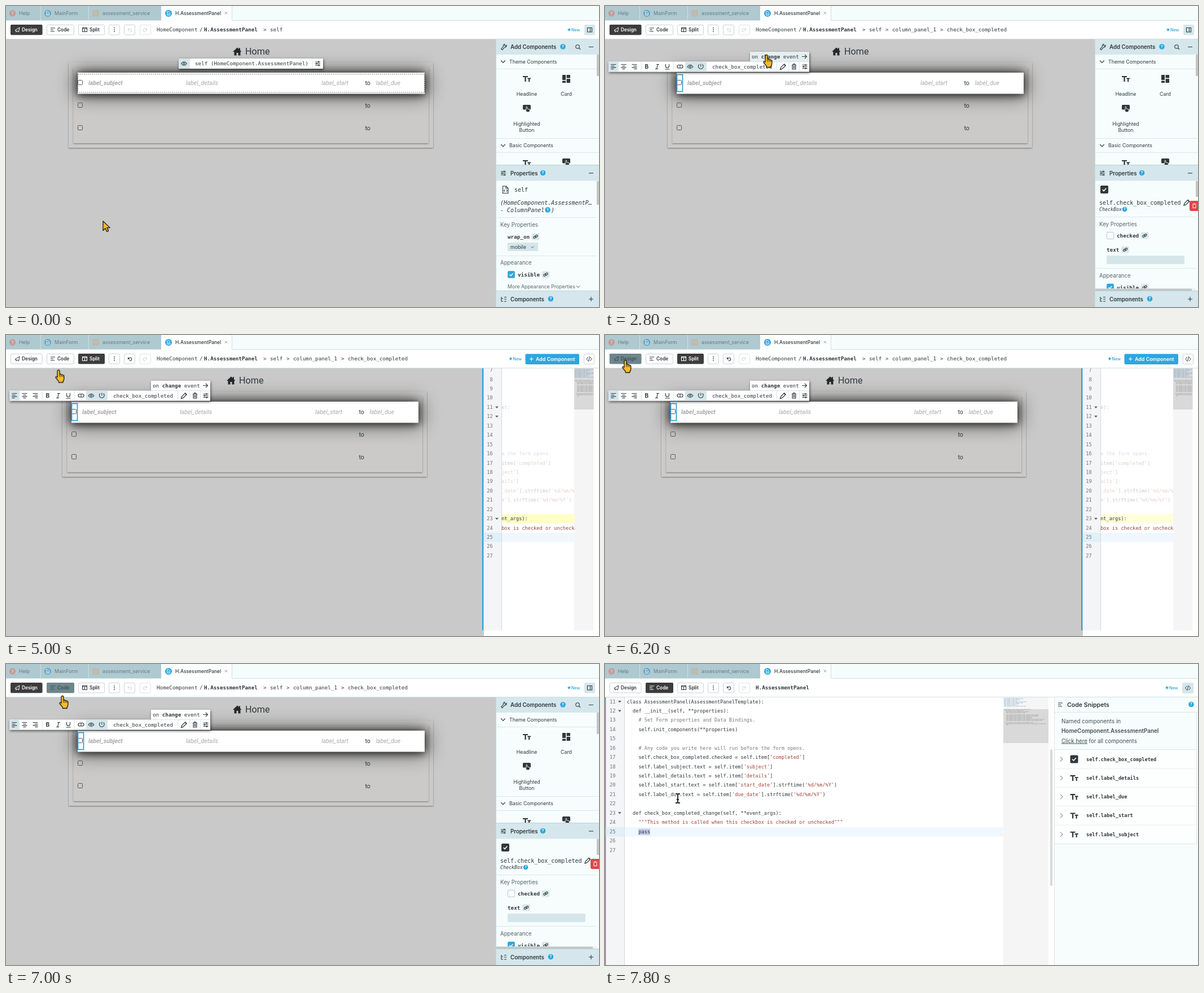
These frames come from a looping animation (1051 by 533 pixels, 8 s). An HTML page:

```html
<!DOCTYPE html>
<html lang="en">
<head>
<meta charset="utf-8">
<title>Form editor</title>
<style>
html, body { margin: 0; width: 100%; height: 100%; overflow: hidden; background: #fff; }
svg { display: block; }
text { font-family: Inter, sans-serif; font-size: 8.8px; fill: currentColor; white-space: pre; }
.ink { color: #2f383c; }
.mono { font-family: "DejaVu Sans Mono", monospace; font-size: 9.27px; }
.m10 { font-size: 10px; }
.m8 { font-size: 8.6px; }
.b { font-weight: 700; }
.sb { font-weight: 600; }
.i { font-style: italic; }
.mid { text-anchor: middle; }
.end { text-anchor: end; }
.head { font-size: 9.7px; font-weight: 600; }
.sub { font-size: 9.7px; color: #59666b; }
.btn { font-size: 8.3px; font-weight: 600; }
.form { font-family: Roboto, sans-serif; font-size: 10.6px; }
.ghost { color: #a9a9a9; font-style: italic; }
.line { fill: none; stroke: currentColor; stroke-width: 1.1; }
.str { fill: #a0443a; }
.com { fill: #7b7b7b; }
.num { fill: #6c7478; }
.dim { opacity: .25; }

.root, .pick, .probe, .design, .split, .code, .onEvent, .onDesign, .onCode,
.arrow, .hand, .beam { animation: 8s step-end infinite; }
.root { animation-name: root; }
.pick { animation-name: pick; }
.probe { animation-name: probe; }
.design { animation-name: design; }
.split { animation-name: split; }
.code { animation-name: code; }
.onEvent { animation-name: onEvent; }
.onDesign { animation-name: onDesign; }
.onCode { animation-name: onCode; }
.arrow { animation-name: arrow; }
.hand { animation-name: hand; }
.beam { animation-name: code; }
.page { animation: page 8s step-end infinite; }
.flash { animation: flash 8s infinite; }
.cursor { animation: cursor 8s infinite; }

@keyframes root { 0% { opacity: 1 } 20%, 100% { opacity: 0 } }
@keyframes pick { 0% { opacity: 0 } 20%, 100% { opacity: 1 } }
@keyframes probe { 0% { opacity: 0 } 15% { opacity: 1 } 20%, 100% { opacity: 0 } }
@keyframes design { 0% { opacity: 1 } 42.5% { opacity: 0 } 80% { opacity: 1 } 90%, 100% { opacity: 0 } }
@keyframes split { 0% { opacity: 0 } 42.5% { opacity: 1 } 80%, 100% { opacity: 0 } }
@keyframes code { 0% { opacity: 0 } 90%, 100% { opacity: 1 } }
@keyframes onEvent { 0% { opacity: 0 } 27.5% { opacity: 1 } 55%, 100% { opacity: 0 } }
@keyframes onDesign { 0% { opacity: 0 } 65% { opacity: 1 } 80%, 100% { opacity: 0 } }
@keyframes onCode { 0% { opacity: 0 } 85% { opacity: 1 } 90%, 100% { opacity: 0 } }
@keyframes arrow { 0% { opacity: 1 } 12.5% { opacity: 0 } 57.5% { opacity: 1 } 62.5%, 100% { opacity: 0 } }
@keyframes hand { 0% { opacity: 0 } 12.5% { opacity: 1 } 57.5% { opacity: 0 } 62.5% { opacity: 1 } 90%, 100% { opacity: 0 } }
@keyframes page { 0% { transform: none } 42.5% { transform: translateX(-11px) } 80%, 100% { transform: none } }
@keyframes flash {
  0%, 42.5% { opacity: .72; animation-timing-function: steps(15) }
  80%, 100% { opacity: .3 }
}
@keyframes cursor {
  0% { transform: translate(172px, 381px); animation-timing-function: steps(2) }
  5% { transform: translate(167px, 345px); animation-timing-function: steps(2) }
  10% { transform: translate(143px, 195px); animation-timing-function: steps(2) }
  15%, 20% { transform: translate(133px, 133px); animation-timing-function: steps(2) }
  25% { transform: translate(205px, 112px); animation-timing-function: steps(2) }
  30% { transform: translate(281px, 89px); animation-timing-function: steps(2) }
  35%, 40% { transform: translate(287px, 87px); animation-timing-function: steps(5) }
  52.5%, 55% { transform: translate(279px, 105px); animation-timing-function: steps(2) }
  60% { transform: translate(150px, 78px); animation-timing-function: steps(2) }
  65% { transform: translate(38px, 47px); animation-timing-function: step-end }
  67.5%, 80% { transform: translate(37px, 45px); animation-timing-function: steps(2) }
  85% { transform: translate(97px, 46px); animation-timing-function: step-end }
  87.5% { transform: translate(101px, 57px); animation-timing-function: steps(4) }
  97.5%, 100% { transform: translate(129px, 238px) }
}
</style>
</head>
<body>
<svg width="1051" height="533" viewBox="0 0 1051 533" class="ink">
<defs>
  <filter id="glow" x="-30%" y="-300%" width="160%" height="700%"><feGaussianBlur stdDeviation="7"/></filter>
  <filter id="halo" x="-30%" y="-300%" width="160%" height="700%"><feGaussianBlur stdDeviation="17"/></filter>
  <filter id="lift" x="-10%" y="-30%" width="120%" height="180%"><feDropShadow dx="1" dy="2" stdDeviation="2" flood-opacity=".6"/></filter>
  <filter id="card" x="-5%" y="-10%" width="110%" height="120%"><feDropShadow dx="0" dy="1" stdDeviation="1.2" flood-opacity=".42"/></filter>
  <clipPath id="splitClip"><path d="M879 59h128v464h-128z"/></clipPath>
  <clipPath id="addClip"><path d="M868 59h183v222h-183z"/></clipPath>
  <clipPath id="propClip"><path d="M868 281h183v224h-183z"/></clipPath>

  <g id="q"><circle r="4.8" fill="#2ba6de"/><text class="mid b" y="2.5" style="font-size:7px;fill:#fff">?</text></g>
  <g id="tt" fill="currentColor"><path d="M-7-5h9v2.1h-3.3v8h-2.3v-8h-3.4zM1.2-1.6h6v1.9h-2v5h-2.1v-5h-1.9z"/></g>
  <g id="press"><rect x="-7" y="-6" width="14" height="8.5" rx="1.5" fill="currentColor"/><path d="M-1-2.5q1.3-1 1.8.5v2.8l4.2 1q1.2 2-.6 5h-4.2l-3-3.5 1.8-.2z" fill="currentColor" stroke="#f6fdfc" stroke-width=".8"/></g>
  <g id="link"><rect x="-6.7" y="-6" width="13.5" height="12" rx="2" fill="#d9e7eb"/><g class="line" transform="rotate(-30)"><rect x="-4" y="-1.6" width="4.6" height="3.2" rx="1.6"/><rect x="-.6" y="-1.6" width="4.6" height="3.2" rx="1.6"/></g></g>
  <g id="sliders" class="line"><path d="M-4.5-3h9M-4.5 0h9M-4.5 3h9"/><path d="M1.5-4.2v2.4M-2-1.2v2.4M2 1.8v2.4" stroke-width="1.9"/></g>
  <g id="eye" class="line"><path d="M-5 0q5-6.500 10 0q-5 6.500-10 0z"/><circle r="1.5"/></g>
  <g id="bars" class="line"><path d="M-4-3h8M-4 0h5M-4 3h7"/></g>
  <g id="down" class="line"><path d="M-3.8-2l3.8 4 3.8-4"/></g>
  <g id="pencil"><path d="M-5 5l1-3.5 6-6.2 2.6 2.6-6.2 6z" fill="none" stroke="currentColor" stroke-width="1.2"/><path d="M1-4l1.5-1 2.5 2.5-1 1.5z" fill="currentColor"/></g>
  <g id="tick"><rect x="-7" y="-7" width="14" height="14" rx="2" fill="currentColor"/><path d="M-3.3 0l2.3 2.5 4.3-4.8" fill="none" stroke="#fff" stroke-width="1.6"/></g>
  <g id="tag"><path d="M-2-4-5 0l3 4M2-4l3 4-3 4M1-5l-2 10" class="line"/></g>
  <g id="doc"><circle r="6" fill="currentColor"/><path d="M-2.3-3.3h3l1.8 1.8v4.8h-4.8z" fill="none" stroke="#fff" stroke-width=".9"/><path d="M-1 0h2M-1 1.6h2" stroke="#fff" stroke-width=".7"/></g>
  <g id="bDesign"><path d="M16 43l8-5-1.5 8-2.8-2-1.7 2.2-.2-2.8z" fill="none" stroke="currentColor"/><text x="28" y="45" class="btn">Design</text></g>
  <g id="bCode"><use href="#bars" x="83" y="42"/><text x="91" y="45" class="btn">Code</text></g>
  <g id="bSplit"><path d="M135.5 38.5h8v7h-8zM139.5 41v4.5M135.5 40h8" class="line"/><text x="148" y="45" class="btn">Split</text></g>
  <g id="undo" class="line"><path d="M216.5 39.5v3h3M216.8 42q2.5-3.5 5.2-1 2 2.8-1 4.5h-2.5"/></g>
  <g id="spark"><path d="M0-3.5l1 2.5 2.5 1-2.5 1-1 2.5-1-2.5-2.5-1 2.5-1z" fill="#2ba0d8"/><text x="4" y="2.6" style="font-size:7.2px;font-weight:500;fill:#2ba0d8">New</text></g>
</defs>

<rect width="1051" height="533" fill="#c9c9ca"/>

<g class="page">
  <path d="M402 81l8-7.5 3 2.8v-2h2v4l2.5 2.7h-2v6.5h-4v-4.5h-3v4.5h-4v-6.5z" fill="#26282a"/>
  <text x="424" y="86" class="form" style="font-size:16.2px">Home</text>
  <g fill="#cbcac9">
    <rect x="111" y="100" width="646" height="151" filter="url(#card)"/><rect x="119.5" y="109" width="629.5" height="134" filter="url(#card)"/>
  </g>
  <rect x="123" y="116" width="623" height="44" opacity=".58" filter="url(#halo)"/>
  <rect x="126" y="118" width="617" height="40" opacity=".75" filter="url(#glow)"/>
  <rect x="127" y="118" width="615" height="37.5" fill="#fff"/>
  <g fill="none" stroke="#55585a">
    <rect x="127.5" y="131.5" width="8" height="8" rx="1"/><rect x="127.5" y="171.5" width="8" height="8" rx="1"/><rect x="127.5" y="211.5" width="8" height="8" rx="1"/>
  </g>
  <g class="ghost">
    <text x="146" y="140" class="form b">label_subject</text><text x="319" y="140" class="form">label_details</text>
    <text x="559" y="140" class="form">label_start</text><text x="655.5" y="140" class="form">label_due</text>
  </g>
  <g style="color:#233845"><text x="636.5" y="140" class="form">to</text><text x="636.5" y="180" class="form">to</text><text x="636.5" y="220" class="form">to</text></g>
  <rect class="root" x="127.5" y="120.5" width="614" height="32.5" fill="none" stroke="#555" stroke-width=".8" stroke-dasharray="2 1.5"/>
  <rect class="probe" x="127" y="121" width="10.500" height="31" fill="none" stroke="#3a9bd0" stroke-dasharray="2 1.5"/>
  <rect class="pick" x="127.5" y="121.5" width="10" height="30" fill="none" stroke="#2f9ad2" stroke-width="1.7"/>
</g>

<g class="root">
  <rect x="306" y="93" width="256" height="18" rx="1" fill="#fdfefe" filter="url(#lift)"/>
  <path d="M306 93h20v18h-20z" fill="#d5e6eb"/>
  <use href="#eye" x="315.5" y="102"/><text x="335" y="105" class="mono">self (HomeComponent.AssessmentPanel)</text><use href="#sliders" x="552.5" y="102"/>
  <path d="M543 93v18" stroke="#dfe5e7"/>
</g>

<g class="pick">
  <g filter="url(#lift)"><path d="M257 81h105v18h-105zM6 98.500h356v18h-356z" fill="#fdfefe"/></g>
  <path class="onEvent" d="M257 81h105v17h-105z" fill="#e4eff1"/>
  <path d="M6 98.500h18v18h-18zM142 98.500h37v18h-37z" fill="#d5e6eb"/>
  <path d="M64.5 99v17M121.5 99v17M179.5 99v17M304.5 99v17M325.5 99v17M344.5 99v17M257 98.5h105" stroke="#dfe5e7" fill="none"/>
  <text x="260" y="93" class="mono">on <tspan class="b">change</tspan> event</text>
  <path class="line" d="M349 89.5h8M354 86l3.5 3.5-3.5 3.5"/>
  <g class="line" transform="translate(0 -.5)">
    <path d="M10.5 104h9M10.5 106.700h6M10.5 109.400h9M10.5 112h5M28.5 104h9M30.5 106.700h5M28.5 109.400h9M30.5 112h5M47.5 104h9M50.5 106.700h6M47.5 109.400h9M51.5 112h5"/>
    <path d="M91 104h5M89 112h5M93.500 104l-2 8M107.5 103.500v3.500q0 3 3 3t3-3v-3.500M106.500 112.500h8"/>
    <rect x="128" y="105" width="10" height="5.500" rx="2.700"/>
    <path d="M133 105v5.500M169.800 103v5M167 104a4.400 4.400 0 1 0 5.600 0M331 105h8M333.500 104.500v-1.500h3v1.500M332 105.500v7h6v-7M334 106.500v4.500M336 106.500v4.500"/>
  </g>
  <text x="70.5" y="111" class="b" style="font-size:10px">B</text>
  <use href="#eye" x="151" y="107.5"/><text x="190" y="110.5" class="mono">check_box_completed</text>
  <use href="#pencil" x="315.5" y="107.5"/><use href="#sliders" x="354" y="107.5"/>
</g>

<g class="design">
  <path d="M868 59h183v474h-183z" fill="#f6fdfc"/>
  <g clip-path="url(#addClip)">
    <path d="M868 111.5h183M868 234.5h183M868 259.5h183" stroke="#dde8ea"/>
    <path d="M868 59h183v27h-183z" fill="#d5e7ec"/>
    <path d="M877.5 76l4-4.5q-1-3.5 2.5-4l-.5 2.5 2 1 1.5-1.5q.5 4-3.5 3.8l-4 4.4z" class="line"/>
    <text x="894" y="76" class="head">Add Components</text><use href="#q" x="987" y="72"/>
    <circle cx="1013" cy="72" r="3.2" class="line"/><path d="M1015.5 74.5l2.5 2.5M1033 72.5h8" class="line" stroke-width="1.5"/>
    <use href="#down" x="881" y="98.5"/><text x="892" y="101.5">Theme Components</text>
    <use href="#tt" x="923" y="129"/><path d="M986 122h6v9h-6zM993.5 122h6.5v5.5h-6.5zM993.5 129h6.5v7h-6.5zM986 132.5h6v3.5h-6z" fill="currentColor"/>
    <text x="923" y="158.5" class="mid">Headline</text><text x="993" y="158.5" class="mid">Card</text>
    <use href="#press" x="923" y="181"/><text x="923" y="212" class="mid">Highlighted</text><text x="923" y="223" class="mid">Button</text>
    <use href="#down" x="881" y="247"/><text x="892" y="250">Basic Components</text>
    <use href="#tt" x="923" y="278"/><use href="#press" x="993" y="276"/>
  </g>
  <g clip-path="url(#propClip)">
    <g class="root">
      <path d="M868 374.5h179M868 442.5h179" stroke="#dde8ea"/>
      <path class="line" d="M880.5 319h6l3.5 3.5v9h-9.5zM886 319v4h4M884 325l-1.5 2 1.5 2M887 325l1.5 2-1.5 2"/>
      <text x="901" y="328.5" class="mono m10">self</text>
      <text x="876" y="352" class="mono m10 i">(HomeComponent.AssessmentP…</text><text x="876" y="364.5" class="mono m10 i">- ColumnPanel</text><text x="966" y="364.5" class="mono m10 i">)</text><use href="#q" x="960" y="361"/>
      <text x="876" y="391" class="sub">Key Properties</text><text x="889" y="412" class="mono b">wrap_on</text><use href="#link" x="938.5" y="408.5"/>
      <rect x="889" y="419" width="54" height="15" rx="1" fill="#d5e6eb"/><text x="894" y="429.5">mobile</text><use href="#down" transform="translate(933 427) scale(.7)"/>
      <text x="876" y="458" class="sub">Appearance</text>
      <use href="#tick" transform="translate(895.5 475.5) scale(.9)" color="#2ba6de"/><text x="907" y="479" class="mono b">visible</text><use href="#link" x="956.5" y="475.5"/>
      <text x="889" y="500" style="color:#59666b">More Appearance Properties</text><use href="#down" transform="translate(1014 497) scale(.8)"/>
      <rect x="1047" y="310" width="4" height="42" fill="#c3c5c5"/>
    </g>
    <g class="pick">
      <path d="M868 373.5h179M868 464.5h179" stroke="#dde8ea"/>
      <use href="#tick" x="885" y="325"/><text x="876" y="351.5" class="mono m10">self.check_box_completed</text><use href="#pencil" x="1031" y="348"/>
      <path d="M1051 345h-12q-3 0-3 3v12q0 3 3 3h12z" fill="#dc484c"/><path d="M1041 351h7M1042 352.5v5h5v-5M1043 350h3" fill="none" stroke="#fff"/>
      <text x="876" y="363" class="mono i" style="font-size:8.3px">CheckBox</text><use href="#q" transform="translate(921 360) scale(.9)"/>
      <text x="876" y="389.5" class="sub">Key Properties</text>
      <rect x="889.5" y="400.5" width="12" height="12" rx="1.5" fill="#fff" stroke="#b8c6ca"/><text x="907" y="410" class="mono b">checked</text><use href="#link" x="956.5" y="406.5"/>
      <text x="889" y="435" class="mono b">text</text><use href="#link" x="922" y="431.5"/>
      <rect x="889" y="442" width="138" height="15" rx="1" fill="#d5e6eb"/>
      <text x="876" y="480.5" class="sub">Appearance</text>
      <use href="#tick" transform="translate(895.5 498) scale(.9)" color="#2ba6de"/><text x="907" y="501.5" class="mono b">visible</text><use href="#link" x="956.5" y="498"/>
      <path d="M869 500h178v5h-178z" fill="#eef3f3"/><rect x="869" y="500.5" width="171" height="4" fill="#c3c5c5"/>
      <rect x="1047" y="310" width="4" height="28" fill="#c3c5c5"/>
    </g>
    <path d="M868 282h183v27.5h-183z" fill="#d5e7ec"/><path d="M868 281.5h183" stroke="#b5d3dc"/>
    <use href="#sliders" x="881.5" y="296"/><text x="894" y="299.5" class="head">Properties</text><use href="#q" x="951.5" y="295.5"/><path d="M1033 296h8" class="line" stroke-width="1.5"/>
  </g>
  <path d="M868 505h183v28h-183z" fill="#d5e7ec"/><path d="M868 504.5h183" stroke="#b5d3dc"/>
  <path class="line" d="M878 515v8h3M878 518h3M883 515.5h4M883 519h4M883 523h4M1033 519h8M1037 515v8"/>
  <text x="894" y="522.5" class="head">Components</text><use href="#q" x="965.5" y="518.5"/>
  <rect x="1047" y="86" width="4" height="38" fill="#c3c5c5"/><path d="M868.5 59v474" stroke="#c5dbe2"/>
</g>

<g class="split">
  <path d="M847 59h204v474h-204z" fill="#fff"/><path d="M847 59h31v464h-31z" fill="#f4f5f6"/>
  <path d="M845 59v464" stroke="#2ba0dc" stroke-width="2"/><path d="M878.5 59v464" stroke="#d5d9da"/>
  <path class="flash" d="M879 317h128v16.5h-128z" fill="#ffff8a"/>
  <path d="M847 350h31v16.5h-31z" fill="#e1eff7"/><path d="M879 350h128v16.5h-128z" fill="#f0f8fe"/>
  <g id="splitNums" transform="translate(844 61.4)"></g>
  <g clip-path="url(#splitClip)"><g id="splitLines" transform="translate(611.8 61.4)"></g></g>
  <path d="M1007 59h34.5v464h-34.5z" fill="#f5f5f5"/><path d="M1007 59h34.5v73h-34.5z" fill="#d9d9d9"/>
  <g id="splitMap" transform="translate(1008 60)"></g>
</g>

<g class="code">
  <path d="M0 59h1051v474h-1051z" fill="#fff"/><path d="M0 59h35v474h-35z" fill="#f4f5f6"/>
  <path d="M.7 59v474" stroke="#2ba6de" stroke-width="1.5"/><path d="M34.5 59v474" stroke="#d5d9da"/>
  <path d="M1.5 289h33v16.5h-33z" fill="#e1eff7"/><path d="M35 289h671v16.5h-671z" fill="#f0f8fe"/><path d="M59 291.5h21v11.5h-21z" fill="#c4cdea"/>
  <g id="codeNums"></g><g id="codeLines"></g>
  <path d="M706 59h80v474h-80z" fill="#f5f5f5"/><path d="M706 80h80v60h-80z" fill="#d9d9d9"/>
  <g id="codeMap" transform="translate(707 60)"></g>
  <rect x="789" y="151" width="4" height="242" rx="2" fill="#d7d9d9"/>
  <path d="M796 59h255v474h-255z" fill="#f6fdfc"/><path d="M797 152h252v166h-252z" fill="#fdfefe"/>
  <path d="M796.5 59v474M797 85.5h254M797 151.5h252M797 318.5h252M1048.5 86v232" stroke="#dae5e7" fill="none"/>
  <use href="#bars" x="807" y="72"/><text x="819" y="75.5" class="sb" style="font-size:10.6px">Code Snippets</text><use href="#q" x="1039" y="71.5"/>
  <g style="color:#444f54">
    <text x="809" y="104.5" style="font-size:9.9px">Named components in</text>
    <text x="809" y="122" class="sb" style="font-size:9.9px">HomeComponent.AssessmentPanel</text>
    <text x="809" y="139.5" style="font-size:9.7px"><tspan text-decoration="underline">Click here</tspan> for all components</text>
  </g>
  <g id="snippets"></g>
</g>

<g>
  <path d="M0 0h1051v26h-1051z" fill="#f4fdfc"/><path d="M0 26h1051v33h-1051z" fill="#fff"/>
  <path d="M0 0h275v26h-275z" fill="#afc9d0"/><path d="M275 0h125v26h-125z" fill="#fdffff"/>
  <path d="M61.5 0v26M146.5 0v26M0 25.5h275M400.5 0v26M400 25.5h651M0 58.5h1051" stroke="#cfdfe3" fill="none"/>
  <circle cx="11.5" cy="13" r="5.7" fill="#c59b98"/><text x="11.5" y="16" class="mid b" style="font-size:8px;fill:#e3d0cf">?</text>
  <use href="#doc" x="74" y="13" color="#63a5c4"/><use href="#doc" x="288" y="13" color="#2ba6de"/>
  <path d="M154.5 8.5h9v9h-9zM156.5 11.5h5M156.5 14.5h5" fill="none" stroke="#d0ab8b" stroke-width="1.5"/>
  <g style="color:#667b83"><text x="23" y="16">Help</text><text x="86" y="16">MainForm</text><text x="171" y="16">assessment_service</text></g>
  <text x="300" y="16" style="font-size:8.5px;font-weight:500">H.AssessmentPanel</text><path d="M388 10.5l4 4M392 10.5l-4 4" stroke="#859196"/>

  <g fill="#fff" stroke="#c9d2d5">
    <rect x="8.5" y="33.5" width="55.5" height="17.5" rx="2"/><rect x="72.5" y="33.5" width="48" height="17.5" rx="2"/><rect x="128.5" y="33.5" width="46" height="17.5" rx="2"/>
    <rect x="182.5" y="33.5" width="19" height="17.5" rx="2"/><rect x="209.5" y="33.5" width="19" height="17.5" rx="2"/><rect x="237.5" y="33.5" width="19" height="17.5" rx="2" opacity=".6"/>
  </g>
  <use href="#bDesign"/><use href="#bCode"/><use href="#bSplit"/>
  <path d="M192 38v1.6M192 41.2v1.6M192 44.4v1.6" stroke="#333" stroke-width="1.6"/>
  <use href="#undo" transform="translate(466 0) scale(-1 1)" opacity=".2"/>
  <g class="design">
    <rect x="8" y="33" width="56.5" height="18.2" rx="2" fill="#3b3c3b"/><use href="#bDesign" color="#fff"/><use href="#undo" opacity=".2"/>
    <use href="#spark" x="998" y="42"/><rect x="1025" y="33" width="19" height="18.5" rx="2" fill="#d5e7ec"/><path class="line" d="M1030.5 38.5h8v7.5h-8zM1035.5 38.5v7.5"/>
  </g>
  <g class="split">
    <rect x="128" y="33" width="47" height="18.2" rx="2" fill="#3b3c3b"/><use href="#bSplit" color="#fff"/><use href="#undo"/>
    <use href="#spark" x="894.5" y="42"/><rect x="920.5" y="33.5" width="95.5" height="18.5" rx="2" fill="#2ba6e2"/>
    <path d="M928 42.5h6.5M931.2 39.2v6.5" stroke="#fff" stroke-width="1.2"/><text x="939" y="45.5" class="sb" style="font-size:8.9px;fill:#fff">Add Component</text>
    <rect x="1024.5" y="33.5" width="18" height="18" rx="2" fill="#fff" stroke="#c9d2d5"/><use href="#tag" transform="translate(1033.5 42.5) scale(.9)"/>
  </g>
  <g class="code">
    <rect x="72" y="33" width="49" height="18.2" rx="2" fill="#3b3c3b"/><use href="#bCode" color="#fff"/><use href="#undo"/>
    <use href="#spark" x="996" y="42"/><rect x="1023" y="33" width="20" height="19" rx="2" fill="#d5e7ec"/><use href="#tag" transform="translate(1033 42.5) scale(.9)"/>
  </g>
  <g class="onDesign"><rect x="8" y="33" width="56.5" height="18.2" rx="2" fill="#6d868c"/><use href="#bDesign" color="#3f5157"/></g>
  <g class="onCode"><rect x="72" y="33" width="49" height="18.2" rx="2" fill="#6d868c"/><use href="#bCode" color="#3f5157"/></g>

  <text x="267" y="45" class="mono">HomeComponent</text><text x="343" y="45" class="mono">/</text><text x="351" y="45" class="mono b">H.AssessmentPanel</text>
  <text x="456" y="45" class="mono">&gt;</text><text x="468" y="45" class="mono">self</text>
  <g class="pick"><text x="497" y="45" class="mono">&gt;</text><text x="509" y="45" class="mono">column_panel_1</text><text x="594" y="45" class="mono">&gt;</text><text x="606" y="45" class="mono">check_box_completed</text></g>
  <g class="code"><path d="M262 32h460v21h-460z" fill="#fff"/><text x="267" y="45" class="mono b">H.AssessmentPanel</text></g>
</g>

<g class="cursor" stroke-linejoin="round">
  <path class="arrow" d="M0 0v16.5l4-3.7 2.6 5.7 3-1.4-2.6-5.5h5.2z" fill="#f7b928" stroke="#1d1a14" stroke-width="1.3"/>
  <g class="hand">
    <g transform="translate(-1 -.5)">
      <path d="M-2 2a2 2 0 0 1 4 0v5.5q2-.8 2.9.8q2-.7 2.9.9q2-.3 2.1 1.7v4q0 3-1.9 5.6v1.5h-7.5v-1.5q-1.5-2.5-5-6.2q-1.1-2 .5-2.6q1-.2 2 1.3z" fill="#f9bb2a" stroke="#1d1a14" stroke-width="1.3"/>
      <path d="M2 8v4M4.9 9v3M7.7 10v2.5" stroke="#1d1a14" fill="none"/>
    </g>
  </g>
  <g class="beam" fill="none">
    <path d="M-4-8h2.5q1.5 0 1.5 1.5v13q0 1.5-1.5 1.5h-2.5M4-8h-2.5q-1.5 0-1.5 1.5v13q0 1.5 1.5 1.5h2.5" stroke="#fff" stroke-width="3.6"/>
    <path d="M-4-8h2.5q1.5 0 1.5 1.5v13q0 1.5-1.5 1.5h-2.5M4-8h-2.5q-1.5 0-1.5 1.5v13q0 1.5 1.5 1.5h2.5M-2 2h4" stroke="#25211f" stroke-width="1.9"/>
  </g>
</g>
</svg>
<script>
const lines = `class AssessmentPanel(AssessmentPanelTemplate):
  def __init__(self, **properties):
    # Set Form properties and Data Bindings.
    self.init_components(**properties)

    # Any code you write here will run before the form opens.
    self.check_box_completed.checked = self.item['completed']
    self.label_subject.text = self.item['subject']
    self.label_details.text = self.item['details']
    self.label_start.text = self.item['start_date'].strftime('%d/%m/%Y')
    self.label_due.text = self.item['due_date'].strftime('%d/%m/%Y')

  def check_box_completed_change(self, **event_args):
    """This method is called when this checkbox is checked or unchecked"""
    pass`.split('\n');
const FIRST = 11, PITCH = 16.44, CHAR = 5.177;
const lineY = n => 66.5 + (n - FIRST) * PITCH;
const indent = s => s.length - s.trimStart().length;
const put = (id, html) => document.getElementById(id).innerHTML = html;

const paint = s => s.replace(/""".*"""|'[^']*'|#.*/g,
  m => `<tspan class="${m[0] === '#' ? 'com' : 'str'}">${m}</tspan>`);

// The split pane fades everything above the new method and leaves out its body.
const source = split => lines.map((s, i) => {
  const n = FIRST + i, dim = split && n < 23 ? 'dim' : '';
  return `<text class="mono m8 ${dim}" x="${38.7 + indent(s) * CHAR}" y="${lineY(n) + 3}">${paint(s.trim())}</text>`;
}).join('');

let nums = '';
for (let n = 7; n <= 27; n++) {
  nums += `<text class="mono m8 end num" x="18.7" y="${lineY(n) + 3}">${n}</text>`;
  if ([11, 12, 23].includes(n)) nums += `<path d="M23 ${lineY(n) - 1.5}h6l-3 3.5z" fill="#5d6467"/>`;
}

const miniMap = max => {
  let out = '';
  for (let n = 1; n <= 25; n++) {
    const s = lines[n - FIRST];
    const start = s ? indent(s) : 0;
    const len = s === undefined ? (n < 9 ? 18 + n * 17 % 23 : 0) : s.trim().length;
    const w = Math.min(len, max - start);
    if (w > 0) out += `<path d="M${start} ${n * 1.95 - 1}h${w}" stroke="${n < 9 ? '#4d86b4' : '#77787c'}" stroke-dasharray="4 .8 7 .7 2 .6" opacity=".45"/>`;
  }
  return out;
};

put('codeLines', source(false));
put('splitLines', source(true));
put('codeNums', nums);
put('splitNums', nums);
put('codeMap', miniMap(77));
put('splitMap', miniMap(33));
put('snippets', ['check_box_completed', 'label_details', 'label_due', 'label_start', 'label_subject'].map((name, i) => {
  const y = 168.5 + i * 33.3;
  return `<path class="line" style="color:#8b979b" d="M807 ${y - 4}l4 4-4 4"/>
    <use href="#${i ? 'tt' : 'tick'}" x="831.5" y="${y}"/>
    <text class="mono m8 b" x="853" y="${y + 3}">self.${name}</text>
    ${i ? `<path d="M797 ${y - 16.6}h252" stroke="#eaf0f1"/>` : ''}`;
}).join(''));
</script>
</body>
</html>
```
